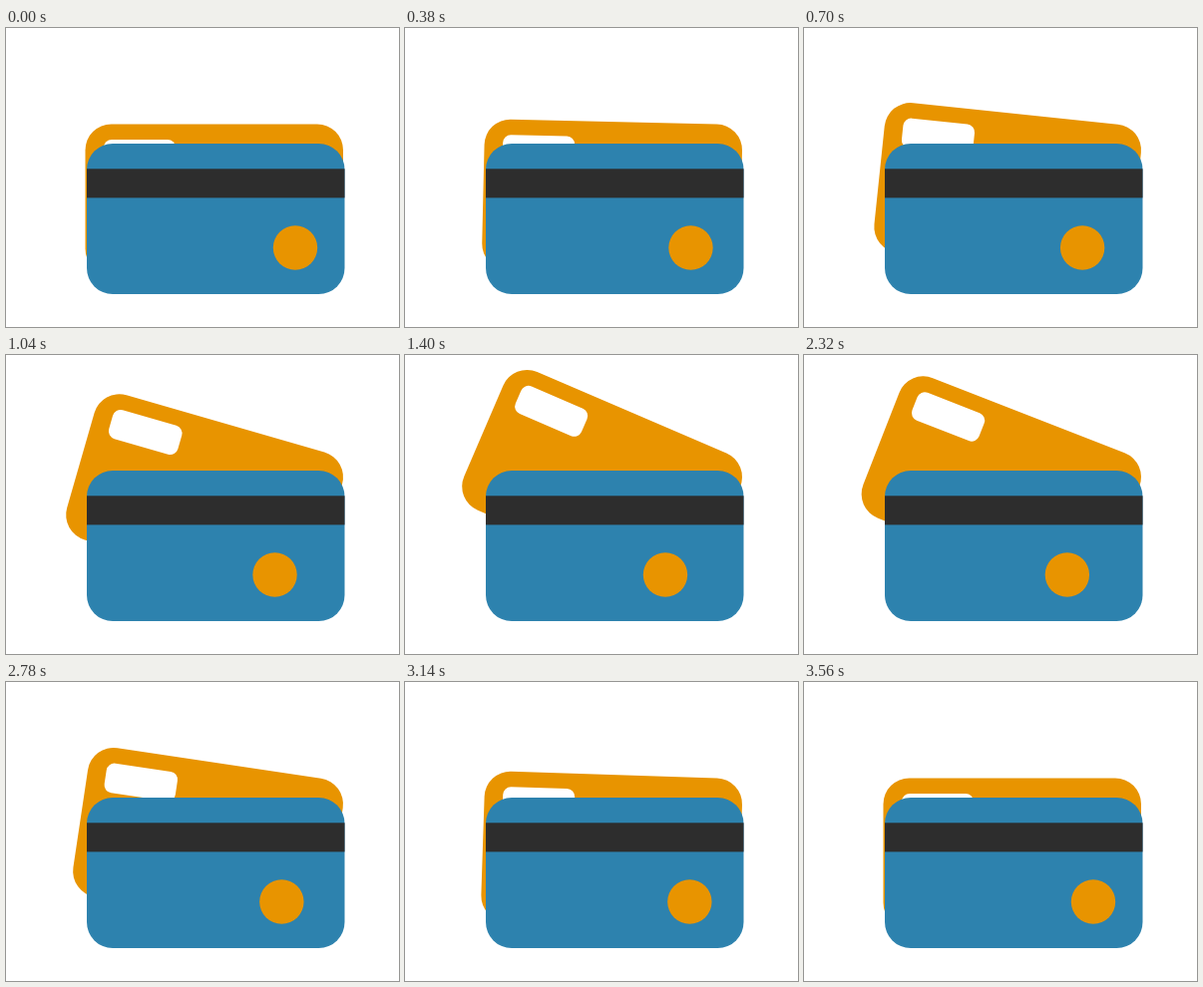
An HTML page for the animation above (3.58 s loop, 394 px wide and 300 px high).

```html
<!DOCTYPE html>
<html lang="en">
<head>
<meta charset="utf-8">
<title>Two cards</title>
<style>
html, body { margin: 0; width: 100%; height: 100%; overflow: hidden; background: #fff; }
svg { display: block; width: 100vw; height: 100vh; }
</style>
</head>
<body>
<svg viewBox="0 0 394 300">
  <g id="back">
    <rect x="79.5" y="96.5" width="258.5" height="151" rx="26" fill="#e89400"/>
    <rect x="98" y="112" width="72" height="30" rx="8" fill="#fff"/>
  </g>
  <rect x="81" y="116" width="258.5" height="151" rx="26" fill="#2d82ae"/>
  <rect x="81" y="141.3" width="258.5" height="29.1" fill="#2d2d2d"/>
  <circle id="dot" cx="290" cy="220.5" r="22.2" fill="#e89400"/>
</svg>
<script>
const LOOP = 3580;
const MAX_TILT = 25;
const back = document.getElementById('back');
const dot = document.getElementById('dot');

// Cubic Bezier timing with control points (x1, 0) and (x2, 1)
function ease(x, x1, x2) {
  let lo = 0, hi = 1, s = 0.5;
  for (let i = 0; i < 24; i++) {
    s = (lo + hi) / 2;
    const r = 1 - s;
    const bx = 3 * r * r * s * x1 + 3 * r * s * s * x2 + s * s * s;
    if (bx < x) lo = s; else hi = s;
  }
  return s * s * (3 - 2 * s);
}

function draw(ms) {
  const t = (ms % LOOP) / LOOP;
  const there = 1 - Math.abs(1 - 2 * t);
  const tilt = MAX_TILT * ease(there, 0.6, 0.45);
  const slide = (1 - Math.cos(2 * Math.PI * t)) / 2;
  back.setAttribute('transform', `rotate(${tilt.toFixed(3)} 312 122.5)`);
  dot.setAttribute('cx', (290 - 32.7 * slide).toFixed(3));
}

let start;
function tick(now) {
  if (start === undefined) start = now;
  draw(now - start);
  requestAnimationFrame(tick);
}
draw(0);
requestAnimationFrame(tick);
</script>
</body>
</html>
```
